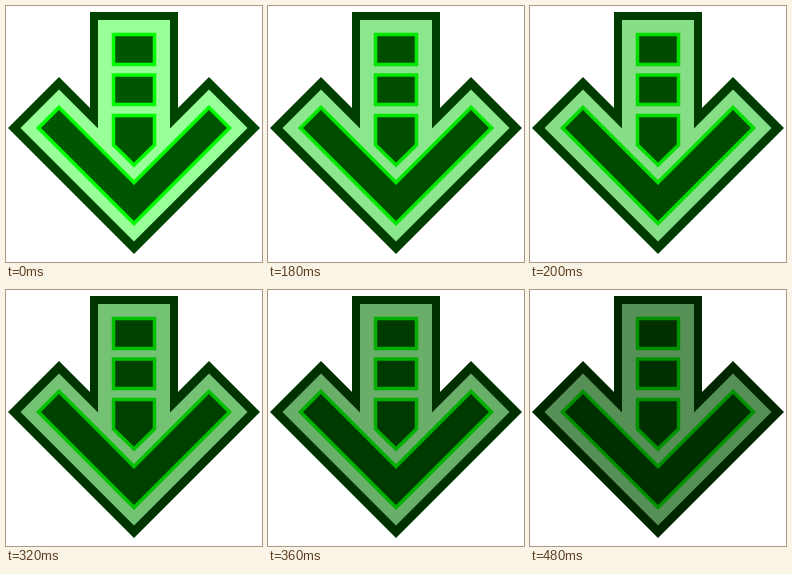
Animation of 256 by 256 pixels, one loop 880 ms. Source, as an HTML page:

```html
<!DOCTYPE html>
<html lang="en">
<head>
<meta charset="utf-8">
<title>Download arrow</title>
<style>
  html, body { margin: 0; width: 100%; height: 100%; overflow: hidden; background: #fff; }
  svg { display: block; width: 100vw; height: 100vh; }
  .arrow { animation: dim 880ms step-end infinite; }
  .edge { fill: #004400; }
  .body { fill: #99ff99; }
  .core { fill: #005500; stroke: #00ff00; stroke-width: 3.5; stroke-miterlimit: 10; }

  /* Brightness falls in hard steps, holds, then snaps back. */
  @keyframes dim {
    0%       { filter: brightness(1); }
    15.909%  { filter: brightness(.938); }
    20.454%  { filter: brightness(.907); }
    22.727%  { filter: brightness(.875); }
    29.545%  { filter: brightness(.813); }
    36.363%  { filter: brightness(.76); }
    38.636%  { filter: brightness(.725); }
    40.909%  { filter: brightness(.688); }
    47.727%  { filter: brightness(.625); }
    54.545%, 100% { filter: brightness(.563); }
  }
</style>
</head>
<body>
<svg class="arrow" viewBox="0 0 256 256">
  <path class="edge" d="M84 6H172V102L203 71L254 122L128 248L2 122L53 71L84 102Z"/>
  <path class="body" d="M92 14H164V122.5L203 83.5L241.5 122L128 235.5L14.5 122L53 83.5L92 122.5Z"/>
  <g class="core">
    <path d="M107.5 28.5H148.5V58.5H107.5Z"/>
    <path d="M107.5 69H148.5V98.5H107.5Z"/>
    <path d="M107.5 109.5H148.5V139L128 159L107.5 139Z"/>
    <path d="M32.5 122L53 101.5L128 176.5L203 101.5L223.5 122L128 217.5Z"/>
  </g>
</svg>
</body>
</html>
```
